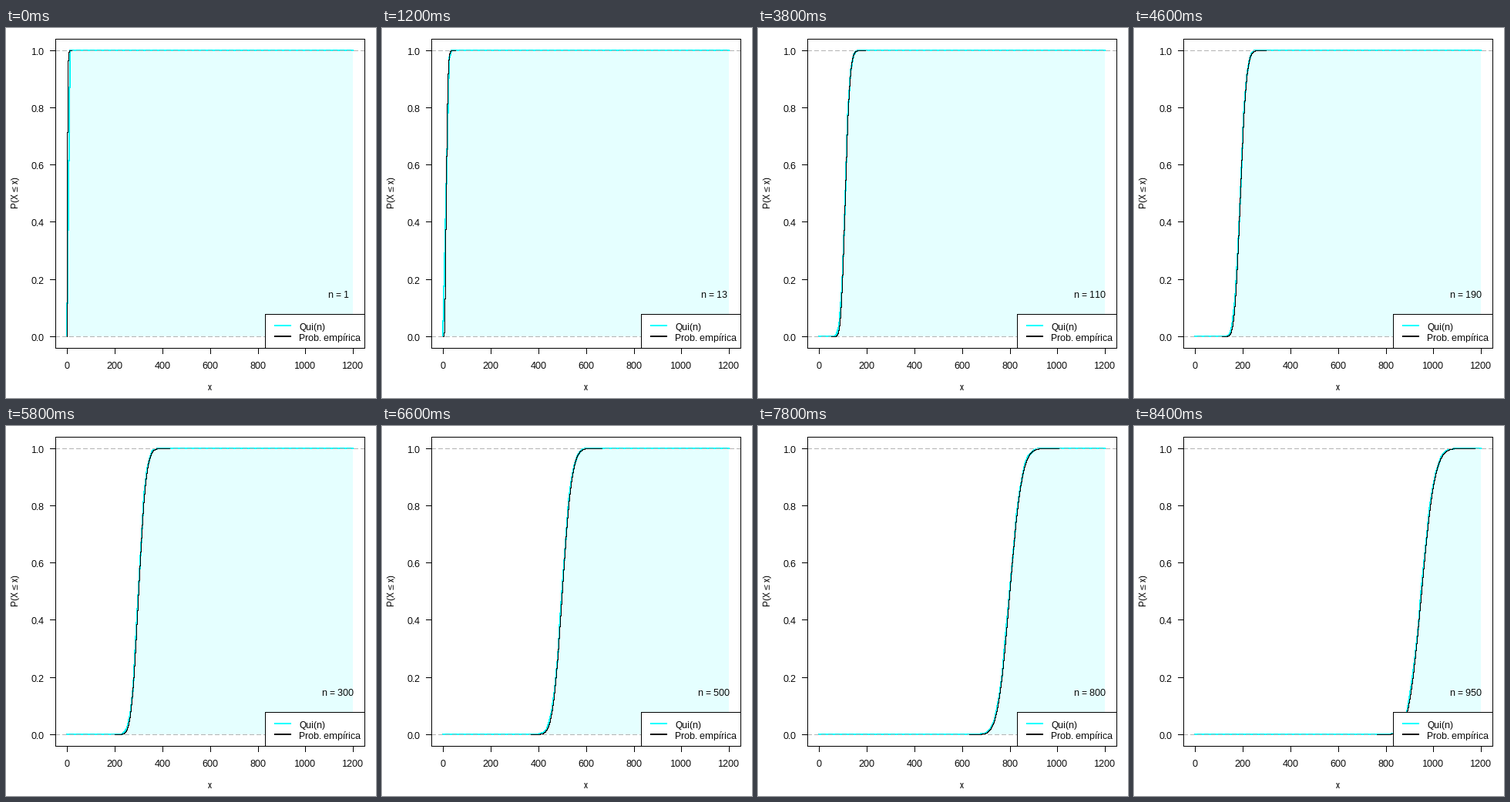
A matplotlib script that plays this animation: 480 by 480 pixels, repeating every 8.6 s.

```python
import numpy as np
import matplotlib.pyplot as plt
from matplotlib.animation import FuncAnimation
from matplotlib.patches import Polygon, Rectangle

plt.rcParams.update({
    "font.family": "Liberation Sans",
    "font.size": 12,
    "text.hinting": "native",
    "text.hinting_factor": 1,
    "path.snap": False,
})

SIZE, DPI = 480, 72  # at 72 dpi one point is one pixel
XMAX = 1200
CYAN, FILL, GRAY = "#00ffff", "#e5ffff", "#b3b3b3"
LEFT, RIGHT, TOP, BOTTOM = 64.5, 465.5, 14.5, 415.5
SPAN = 400.8 / 1.08  # plot region without its 4% padding

DEGREES = [*range(1, 30, 2), *range(30, 200, 20),
           *range(200, 301, 20), *range(350, 951, 50)]

root = np.linspace(1e-6, np.sqrt(XMAX), 6000)
grid = np.linspace(0, XMAX, 101)


def px(x):
    return np.floor(64.8 + 0.04 * SPAN + np.asarray(x) * SPAN / XMAX)


def py(p):
    return np.floor(415.2 - 0.04 * SPAN - np.asarray(p) * SPAN)


def chi2_cdf(n):
    """Chi-square CDF at root**2, integrated over the square root of x."""
    log_f = (n - 1) * np.log(root) - root ** 2 / 2
    f = np.exp(log_f - log_f.max())
    area = np.concatenate([[0], np.cumsum(f[1:] + f[:-1])])
    return area / area[-1]


def empirical(cdf):
    """Step curve over the sampled range, extended by 8% on both sides."""
    seen = (cdf > 6e-5) & (cdf < 1 - 1.3e-5)
    x, p = root[seen] ** 2, cdf[seen]
    pad = 0.08 * (x[-1] - x[0])
    x = np.concatenate([[x[0] - pad, x[0]], x, [x[-1], x[-1] + pad]])
    p = np.concatenate([[0, 0], p, [1, 1]])
    return x, p


fig = plt.figure(figsize=(SIZE / DPI, SIZE / DPI), dpi=DPI, facecolor="white")
ax = fig.add_axes([0, 0, 1, 1])
ax.set_xlim(0, SIZE)
ax.set_ylim(SIZE, 0)
ax.axis("off")


def line(xs, ys, color="black", lw=1, z=3, cap="projecting", **kw):
    return ax.plot(xs, ys, color=color, lw=lw, zorder=z, antialiased=False,
                   solid_joinstyle="miter", solid_capstyle=cap, **kw)[0]


def label(x, y, s, ha="center", z=8):
    return ax.text(x, y, s, ha=ha, va="baseline", zorder=z)


def frame_box(x, y, w, h, fill, z):
    ax.add_patch(Rectangle((x, y), w, h, fc=fill, ec="black", lw=1,
                           antialiased=False, zorder=z))


# axes
frame_box(LEFT, TOP, RIGHT - LEFT, BOTTOM - TOP, "none", 5)
for v in range(0, XMAX + 1, 200):
    x = px(v)
    line([x + 0.5, x + 0.5], [BOTTOM, BOTTOM + 7])
    label(x, 442, str(v))
for v in range(0, 11, 2):
    y = py(v / 10)
    line([LEFT - 7, LEFT], [y + 0.5, y + 0.5])
    label(50, y + 6, f"{v / 10:.1f}", ha="right")
label(264, 470, "x")
ax.text(18, 214, "P(X ≤ x)", rotation=90, ha="right", va="center")

# dashed limits, above the theoretical curve
for p in (0, 1):
    y = py(p) + 0.5
    line([64, 466], [y, y], GRAY, z=2.5, ls=(0, (5, 3)),
         dash_capstyle="butt")

# legend
frame_box(336.5, 371.5, RIGHT - 336.5, BOTTOM - 371.5, "white", 6)
for y, color, name in ((386, CYAN, "Qui(n)"), (400, "black", "Prob. empírica")):
    line([348, 370], [y, y], color, 2, z=7, cap="butt")
    label(380, y + 6, name, ha="left")

# moving parts; both curves are pixel stairs
area = ax.add_patch(Polygon([[0, 0]], fc=FILL, ec="none", antialiased=False,
                            zorder=1))
theory = line([], [], CYAN, 2, z=2, drawstyle="steps-post")
sample = line([], [], z=3, drawstyle="steps-post")
count = label(431, 350, "")


def update(i):
    n = DEGREES[i]
    cdf = chi2_cdf(n)
    xs, ys = px(grid), py(np.interp(np.sqrt(grid), root, cdf))
    fine = np.linspace(xs[0], xs[-1], 8000)
    theory.set_data(np.round(fine), np.round(np.interp(fine, xs, ys)))
    area.set_xy(np.column_stack([np.append(xs, [xs[-1], xs[0]]),
                                 np.append(ys, [py(0), py(0)])]))
    x, p = empirical(cdf)
    sample.set_data(px(x) + 0.5, py(p) + 0.5)
    count.set_text(f"n = {n}")
    return area, theory, sample, count


anim = FuncAnimation(fig, update, frames=len(DEGREES), interval=200,
                     repeat=True, repeat_delay=0, blit=False)
plt.show()
```
